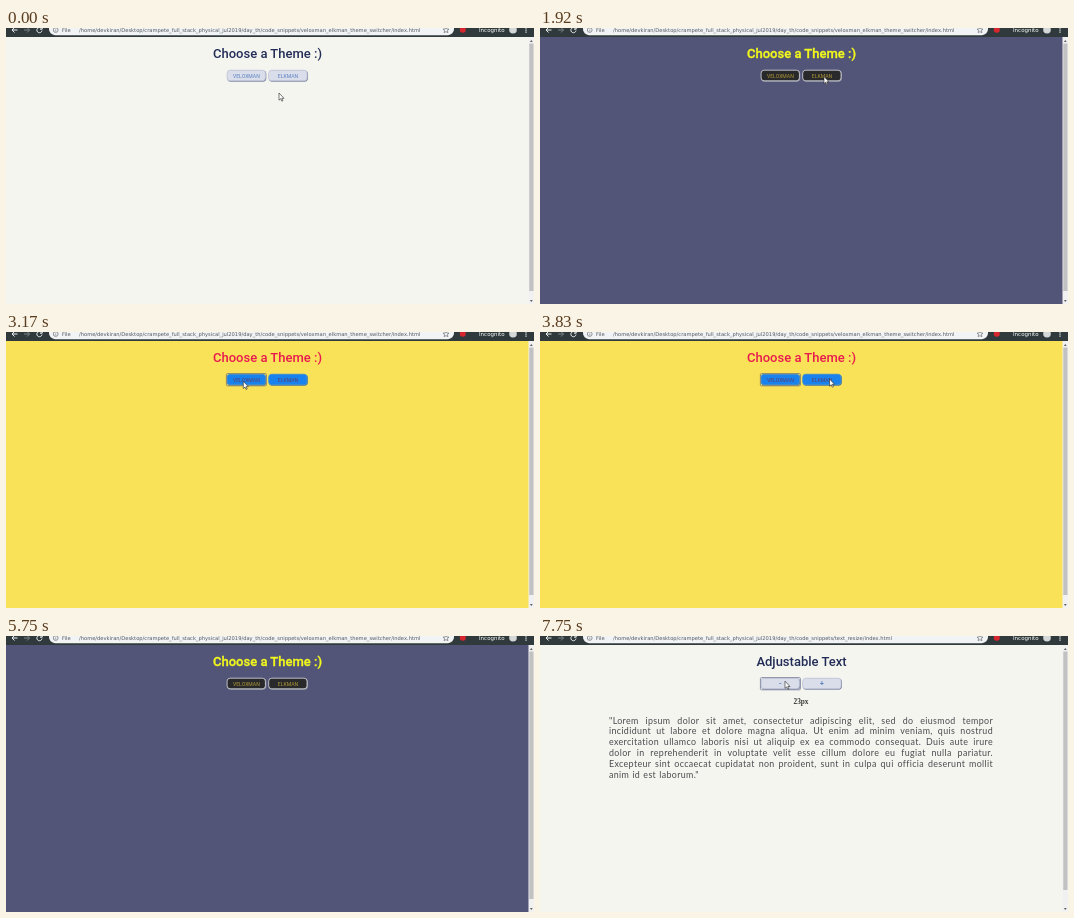
These frames come from a looping animation (528x276 px, 8 s). An HTML page:

```html
<!DOCTYPE html>
<html lang="en">
<head>
<meta charset="utf-8">
<title>Theme switcher and text resizer</title>
<style>
  html, body { margin: 0; width: 528px; height: 276px; overflow: hidden; }
  body { position: relative; background: var(--page); }
  svg { position: absolute; left: 0; top: 0; }
  .light { --page: #f5f5f0; --title: #222d57; --face: #dadeea; --edge: #c3c8d9; --shade: #777f9f; --label: #5b80c0; --ring: #8a90a8; }
  .dark { --page: #525578; --title: #f3f91c; --face: #29292c; --edge: #d9dade; --shade: #8f91a3; --label: #b29b35; --ring: none; }
  .bright { --page: #f9e158; --title: #e8194f; --face: #1a82ec; --edge: #4b94cd; --shade: #54788f; --label: #5b3c6c; --ring: #8b8972; }
  .ui { font-family: "DejaVu Sans", sans-serif; font-size: 5.16px; fill: #55595d; }
  .mid { text-anchor: middle; }
  #title { font: 500 13px Roboto, sans-serif; fill: var(--title); }
  .dark #title { stroke: var(--title); stroke-width: .35; }
  .label { font: 5.1px Roboto, sans-serif; fill: var(--label); }
  .sign { font: 700 7px Roboto, sans-serif; }
  .face { fill: var(--face); stroke: var(--edge); stroke-width: .8; }
  .shade { fill: var(--shade); }
  .ring { fill: none; stroke: var(--ring); stroke-width: 1; }
  #size { font: 700 7.3px "Liberation Serif", serif; fill: #3a3a3a; }
  #text { position: absolute; left: 69px; top: 79.5px; width: 384px; color: #4b4b50;
    font-family: Lato, sans-serif; letter-spacing: .04em; word-spacing: .06em; }
  #text div { white-space: nowrap; text-align: justify; text-align-last: justify; }
  #text div:last-child { text-align-last: left; }
</style>
</head>
<body class="light">
<div id="text"></div>
<svg width="528" height="276" viewBox="0 0 528 276">
  <path d="M0 0H528V9H0Z" fill="#303a3c"/>
  <path d="M43 0H448V1A6 6 0 0 1 442 7.2H49A6 6 0 0 1 43 1Z" fill="#f1f3f4"/>
  <g fill="none" stroke="#eef0f0" stroke-width="1">
    <path d="M11.5 2H6M8.5 -.5L6 2L8.5 4.5"/>
    <path d="M18 2H23.5M21 -.5L23.5 2L21 4.5" stroke="#7d8485"/>
    <path d="M35.3 .3A2.6 2.6 0 1 0 36 2.6M36.2 -1V1.2H34"/>
    <g stroke="#6b6f73" stroke-width=".7">
      <circle cx="49.7" cy="2" r="2.4"/>
      <path d="M49.7 1.7V3.4M49.7 .5V1.1"/>
      <path d="M440 -1L440.9 1L443 1.2L441.4 2.6L441.9 4.7L440 3.6L438.1 4.7L438.6 2.6L437 1.2L439.1 1Z"/>
    </g>
  </g>
  <text class="ui" x="56" y="3.8">File</text>
  <text class="ui" id="url" x="73" y="3.8"></text>
  <circle cx="456.8" cy="1.8" r="3" fill="#d8262f"/>
  <text class="ui" x="473" y="3.9" style="font-size:5.5px;fill:#fff">Incognito</text>
  <circle cx="507" cy="1.8" r="3.8" fill="#d5d8d9"/>
  <path d="M519.4 -.4h1.2v1.2h-1.2zM519.4 1.6h1.2v1.2h-1.2zM519.4 3.6h1.2v1.2h-1.2z" fill="#eef0f0"/>

  <path d="M522.5 9H528V276H522.5Z" fill="#f1f1f1"/>
  <path d="M523.9 14L525.3 12L526.7 14ZM523.9 272L525.3 274L526.7 272Z" fill="#5c5c5c"/>
  <rect id="thumb" x="523.3" y="15.5" width="4.2" fill="#c1c1c1"/>

  <text id="title" class="mid" x="261.5" y="30"></text>
  <g id="buttons"></g>
  <text id="size" class="mid" x="261" y="68"></text>
  <path id="cursor" d="M0 0V7.2L1.7 5.7L2.8 8.2L3.9 7.7L2.8 5.3H5Z" fill="#fff" stroke="#222" stroke-width=".6" stroke-linejoin="round"/>
</svg>
<script>
const LOOP = 8000;
const SCALE = .3867; // stage pixels per page pixel
const $ = id => document.getElementById(id);
const root = "/home/devkiran/Desktop/crampete_full_stack_physical_jul2019/day_th/code_snippets/";
const lorem = [
  '"Lorem ipsum dolor sit amet, consectetur adipiscing elit, sed do eiusmod tempor',
  'incididunt ut labore et dolore magna aliqua. Ut enim ad minim veniam, quis nostrud',
  'exercitation ullamco laboris nisi ut aliquip ex ea commodo consequat. Duis aute irure',
  'dolor in reprehenderit in voluptate velit esse cillum dolore eu fugiat nulla pariatur.',
  'Excepteur sint occaecat cupidatat non proident, sunt in culpa qui officia deserunt'
];

// [start, theme, focused button or -1, paragraph size or 0]
const scenes = [
  [0, "light", -1, 0], [1880, "light", 1, 0], [1920, "dark", 1, 0],
  [3080, "dark", 0, 0], [3170, "bright", 0, 0], [5130, "dark", 1, 0],
  [6380, "light", -1, 24], [7630, "light", 0, 24], [7750, "light", 0, 23]
];

// [first step, last step, steps, x, y]: the pointer jumps in equal parts to x, y
const moves = [
  [420, 420, 1, 272.8, 65], [630, 920, 4, 283.5, 50.2], [1500, 1500, 1, 284, 48.5],
  [2420, 2750, 4, 237.3, 49.3], [3670, 3830, 3, 289.5, 47],
  [5330, 5750, 6, 262, -12], [6420, 7170, 9, 244.6, 45.6], [7290, 7290, 1, 245, 45.2]
];

$("buttons").innerHTML = [221, 262.6].map(x => `
  <rect class="shade" x="${x + .2}" y="42.4" width="39.1" height="11.3" rx="3.4"/>
  <rect class="face" x="${x + .1}" y="42.2" width="38.3" height="10.6" rx="3"/>
  <rect class="ring" x="${x - .6}" y="41.6" width="40" height="12.2" rx="1"/>
  <text class="label mid" x="${x + 19.4}" y="49.7"></text>`).join("");
const rings = document.querySelectorAll(".ring");
const labels = document.querySelectorAll(".label");

function showScene([, theme, focus, size]) {
  document.body.className = theme;
  $("title").textContent = size ? "Adjustable Text" : "Choose a Theme :)";
  $("url").textContent = root + (size ? "text_resize" : "veloxman_elkman_theme_switcher") + "/index.html";
  $("thumb").setAttribute("height", size ? 238.5 : 247.5);
  $("size").textContent = size ? size + "px" : "";
  const names = size ? ["-", "+"] : ["VELOXMAN", "ELKMAN"];
  labels.forEach((label, i) => {
    label.textContent = names[i];
    label.classList.toggle("sign", size > 0);
    rings[i].style.display = i === focus ? "" : "none";
  });
  const lines = size === 24
    ? [...lorem, 'mollit anim id est laborum."']
    : [...lorem.slice(0, 4), lorem[4] + " mollit", 'anim id est laborum."'];
  $("text").style.fontSize = size * SCALE + "px";
  $("text").style.lineHeight = (size + 5) * SCALE + "px";
  $("text").innerHTML = size ? lines.map(line => `<div>${line}</div>`).join("") : "";
}

function pointerAt(t) {
  let x = 273, y = 65;
  for (const [start, end, steps, toX, toY] of moves) {
    if (t < start) break;
    const gap = (end - start) / (steps - 1 || 1);
    const done = gap ? Math.min(steps, Math.floor((t - start) / gap + 1.001)) : 1;
    x += (toX - x) * done / steps;
    y += (toY - y) * done / steps;
  }
  return [x, y];
}

let current;
function draw() {
  const t = performance.now() % LOOP;
  const scene = scenes.findLast(s => s[0] <= t);
  if (scene !== current) showScene(current = scene);
  $("cursor").setAttribute("transform", `translate(${pointerAt(t)})`);
  requestAnimationFrame(draw);
}
draw();
</script>
</body>
</html>
```
